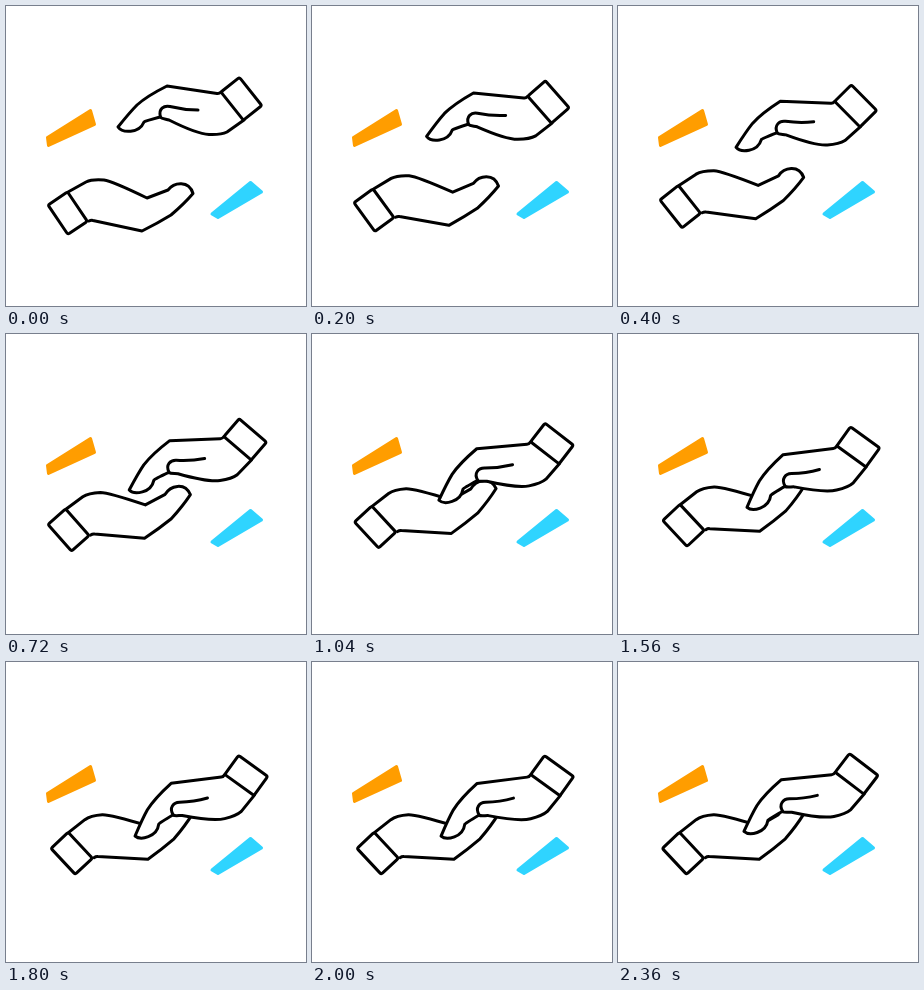
Animation of 300x300 px, one loop 2440 ms. Source, as an HTML page:

```html
<!DOCTYPE html>
<html lang="en">
<head>
<meta charset="utf-8">
<title>Joining hands</title>
<style>
  html, body { margin: 0; width: 100%; height: 100%; overflow: hidden; background: #fff; }
  svg { display: block; width: 100%; height: 100%; }
  .hand { fill: #fff; stroke: #000; stroke-width: 3; stroke-linecap: round; stroke-linejoin: round; }
  .line { fill: none; }
  .accent { stroke-width: 3; stroke-linejoin: round; }
</style>
</head>
<body>
<svg viewBox="0 0 300 300">
  <path class="accent" fill="#ff9d00" stroke="#ff9d00" d="M41.5 131.5L84.5 104.5 88.5 118.5 42.5 139.5Z"/>
  <path class="accent" fill="#2fd4ff" stroke="#2fd4ff" d="M244.5 176.5L255.5 186 212 211.5 206 208Z"/>
  <g class="hand" id="lower">
    <path d="M62 186L80 176Q86 173 98 174Q106 175 141 192L162 184C168 176 183 174 187 187.5Q178 198 165 209Q152 217 136 225L87 214.5Q85 214 83 215"/>
    <rect width="23.5" height="35.5" rx="2" transform="translate(42 199) rotate(-34)"/>
  </g>
  <g class="hand" id="upper">
    <path d="M215 86Q213 88 211 87.5L161 80Q141 90 131 99Q124 106 112 121C116 127 133 128 138 116Q139 115 154 111C156 113 160 113 163 114Q191 128 203 128.5Q215 129 221 126L238 114"/>
    <path class="line" d="M154.500 111C152 103 158 99 164 100.5Q178 104 192 104"/>
    <rect width="23.5" height="36" rx="2" transform="translate(215 86) rotate(-38.5)"/>
  </g>
</svg>
<script>
const LOOP = 2440, STEP = 40;
const upper = document.getElementById('upper');
const lower = document.getElementById('lower');

const progress = (t, from, to) => Math.min(Math.max((t - from) / (to - from), 0), 1);
const easeOut = p => 1 - (1 - p) ** 3 * (1 + p);
const smooth = p => p * p * (3 - 2 * p);

function place(hand, x, y, angle, pivot) {
  hand.setAttribute('transform', `translate(${x} ${y}) rotate(${angle} ${pivot})`);
}

function draw(now) {
  const t = Math.floor(now % LOOP / STEP) * STEP;
  const quick = easeOut(progress(t, STEP, 1440));
  const medium = easeOut(progress(t, STEP, 1790));
  const slow = easeOut(progress(t, STEP, 2200));
  const push = smooth(progress(t, 800, 1700));
  const release = progress(t, 2240, 2360);

  place(upper, 6 * quick - 1.6 * release, 15 * slow - 1.2 * release,
    -15.7 * medium + 1.5 * release, '256 100');
  place(lower, 3 * push - 0.7 * release, -12.6 * medium, -9.1 * quick, '42 199');
}

const start = performance.now();
function tick() {
  draw(performance.now() - start);
  requestAnimationFrame(tick);
}
tick();
</script>
</body>
</html>
```
